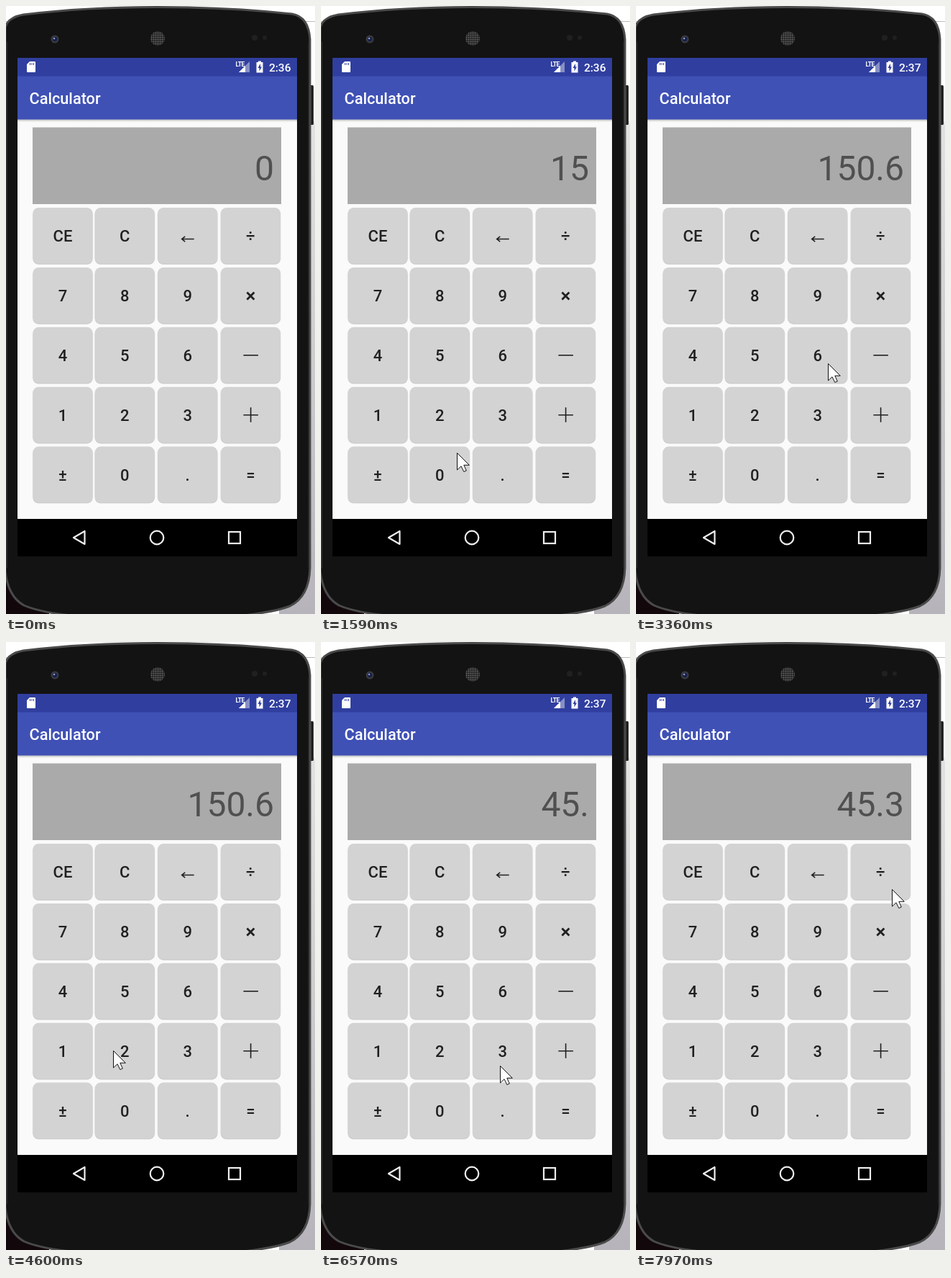
An HTML page that plays this animation: 430 px wide and 844 px high, repeating every 8 s.

```html
<!DOCTYPE html>
<html lang="en">
<head>
<meta charset="utf-8">
<title>Calculator</title>
<style>
  html, body { margin: 0; width: 100%; height: 100%; overflow: hidden; background: #fff; }
  svg { display: block; width: 430px; height: 844px; }
  text { font-family: Roboto, sans-serif; }
  .label { font-size: 22px; font-weight: 500; fill: #202020; text-anchor: middle; }
  .sign { fill: none; stroke: #202020; stroke-width: 1.6; }
  .nav { fill: none; stroke: #eee; stroke-width: 2.2; stroke-linejoin: round; }
</style>
</head>
<body>
<svg viewBox="0 0 430 844">
  <defs>
    <linearGradient id="desk" x2="0" y2="1">
      <stop offset="0" stop-color="#e2e2e2"/><stop offset="1" stop-color="#b6b4ba"/>
    </linearGradient>
    <linearGradient id="barShadow" x2="0" y2="1">
      <stop offset="0" stop-color="#000" stop-opacity=".28"/><stop offset="1" stop-color="#000" stop-opacity="0"/>
    </linearGradient>
    <pattern id="mesh" width="3" height="3" patternUnits="userSpaceOnUse">
      <rect width="3" height="3" fill="#222"/><circle cx="1.5" cy="1.5" r="1" fill="#666"/>
    </pattern>
  </defs>

  <!-- desktop and phone body -->
  <rect width="430" height="844" fill="#fff"/>
  <path d="M0 21.5H430" stroke="#bbb"/>
  <rect x="380" y="160" width="50" height="684" fill="url(#desk)"/>
  <rect y="780" width="60" height="64" fill="#12080c"/>
  <rect x="422" y="110" width="6" height="55" rx="1.5" fill="#222"/>
  <path d="M-1 30Q2 16 24 12Q110 1.500 210 1.500T398 11Q421 15 423 46V780Q422 820 395 833Q375 841 330 846H90Q45 841 25 832Q3 820 -1 785Z"
        fill="#131313" stroke="#4a4a4a" stroke-width="3"/>
  <path d="M1.500 50V780M421 50V780" stroke="#2a2a2a"/>
  <circle cx="68" cy="46" r="5.500" fill="#3b3b40"/>
  <circle cx="68" cy="46" r="3.200" fill="#17204a"/>
  <circle cx="67" cy="45" r="1.300" fill="#8d9ac8"/>
  <circle cx="211" cy="45" r="10" fill="url(#mesh)"/>
  <g fill="#202020"><circle cx="346" cy="44" r="4"/><circle cx="360" cy="44" r="3"/></g>

  <!-- screen -->
  <rect x="16" y="157" width="389" height="555" fill="#fafafa"/>
  <rect x="16" y="157" width="389" height="4" fill="url(#barShadow)"/>
  <rect x="16" y="72" width="389" height="26" fill="#303f9f"/>
  <rect x="16" y="97.500" width="389" height="60" fill="#3f51b5"/>
  <rect x="16" y="712" width="389" height="52" fill="#000"/>

  <!-- status bar -->
  <path d="M33 77H40Q41 77 41 78V91Q41 92 40 92H30Q29 92 29 91V81Z" fill="#fff"/>
  <path d="M33.500 79v3M36 79v3M38.500 79v3" stroke="#303f9f"/>
  <text x="319.500" y="84" font-size="8.500" font-weight="700" fill="#fff" letter-spacing="-.5">LTE</text>
  <path d="M339 77V92H324Z" fill="#8790c5"/>
  <path d="M333 83V92H324Z" fill="#fff"/>
  <path d="M351 76.500H355V78H357.500V92.500H348.500V78H351Z" fill="#fff"/>
  <path d="M354 80L350.500 86H352.500V90.500L356 84.500H354Z" fill="#303f9f"/>
  <text id="clock" x="396.500" y="91" font-size="15.500" font-weight="500" fill="#fff" text-anchor="end"></text>
  <text x="32.500" y="136" font-size="21.700" font-weight="500" fill="#fff">Calculator</text>

  <rect x="37" y="168.500" width="346" height="106.500" fill="#aaa"/>
  <text id="display" x="373" y="242" font-size="48" fill="#505050" text-anchor="end"></text>
  <g id="keys"></g>

  <g class="nav">
    <path d="M94 738L109.500 729V747Z"/>
    <circle cx="210" cy="738" r="9.300"/>
    <rect x="310" y="730" width="16" height="16" stroke-linejoin="miter"/>
  </g>

  <path id="cursor" d="M.5 .5V24L6 18.800L9.800 26.500L13.300 25L9.800 17.300H17.300Z" fill="#fff" stroke="#111" stroke-width="1"/>
</svg>
<script>
const LOOP = 8000;
const $ = id => document.getElementById(id);

// Signs that are drawn as strokes around the key centre.
const signs = {
  '←': '<path class="sign" d="M-8 4.500H9M-3.500 .8L-8 4.500L-3.500 8.200"/>',
  '×': '<path class="sign" stroke-width="2.800" style="stroke-width:2.8" d="M-5 -4.500L5 5.500M5 -4.500L-5 5.500"/>',
  '−': '<path class="sign" d="M-10 0H10.500"/>',
  '+': '<path class="sign" d="M-10 0H10.500M.2 -10.500V10"/>'
};
const rows = ['CE C ← ÷', '7 8 9 ×', '4 5 6 −', '1 2 3 +', '± 0 . ='];
const columns = [79, 165.3, 252.7, 340.4];

function key(label, cx, top) {
  const box = (dy, grow, paint) =>
    `<rect x="${-41.5 - grow}" y="${-39 + dy}" width="${83 + 2 * grow}" height="77.500" rx="8" ${paint}/>`;
  return `<g transform="translate(${cx} ${top + 39})">` +
    box(1, .7, 'fill="#000" opacity=".07"') + box(1.5, 0, 'fill="#000" opacity=".12"') +
    box(0, 0, 'fill="#d3d3d3"') +
    (signs[label] || `<text class="label" y="8.300">${label}</text>`) + '</g>';
}

$('keys').innerHTML = rows.map((row, r) =>
  row.split(' ').map((label, c) => key(label, columns[c], 280 + r * 82.9)).join('')).join('');

// Display value from each time on.
const values = [
  [0, '0'], [700, '1'], [1310, '15'], [1790, '150'], [2380, '150.'], [3160, '150.6'],
  [5200, '4'], [5900, '45'], [6330, '45.'], [6800, '45.3']
];

// Pointer path: time, x, y.
const path = [
  [100, 110, 813], [450, 72, 640], [620, 66, 585], [870, 84, 579],
  [1160, 180, 504], [1310, 180, 504], [1590, 189, 620], [1760, 150, 658],
  [1900, 160, 663], [2100, 207, 661], [2380, 250, 656], [2640, 262, 570],
  [2880, 248, 502], [2970, 248, 502], [2980, 240, 500], [3150, 240, 500],
  [3220, 222, 494], [3360, 267, 496], [3880, 350, 478], [4000, 350, 478],
  [4100, 362, 466], [4250, 340, 480], [4600, 149, 567], [4810, 119, 548],
  [5200, 75, 498], [5640, 124, 499], [5770, 124, 499], [5780, 155, 494],
  [5950, 165, 498], [6330, 245, 651], [6570, 249, 588], [6800, 228, 572],
  [7190, 246, 553], [7420, 250, 550], [7970, 356, 343]
];

function pointerAt(t) {
  const next = path.findIndex(p => p[0] > t);
  if (next < 0) return path[path.length - 1].slice(1);
  const [t0, x0, y0] = path[next - 1], [t1, x1, y1] = path[next];
  const k = (t - t0) / (t1 - t0);
  return [x0 + (x1 - x0) * k, y0 + (y1 - y0) * k].map(Math.round);
}

function render(t) {
  $('display').textContent = values.filter(v => v[0] <= t).pop()[1];
  $('clock').textContent = t < 2980 ? '2:36' : '2:37';
  const visible = t >= path[0][0];
  $('cursor').style.display = visible ? '' : 'none';
  if (visible) $('cursor').setAttribute('transform', `translate(${pointerAt(t)})`);
}

function frame() {
  render(performance.now() % LOOP);
  requestAnimationFrame(frame);
}
frame();
</script>
</body>
</html>
```
